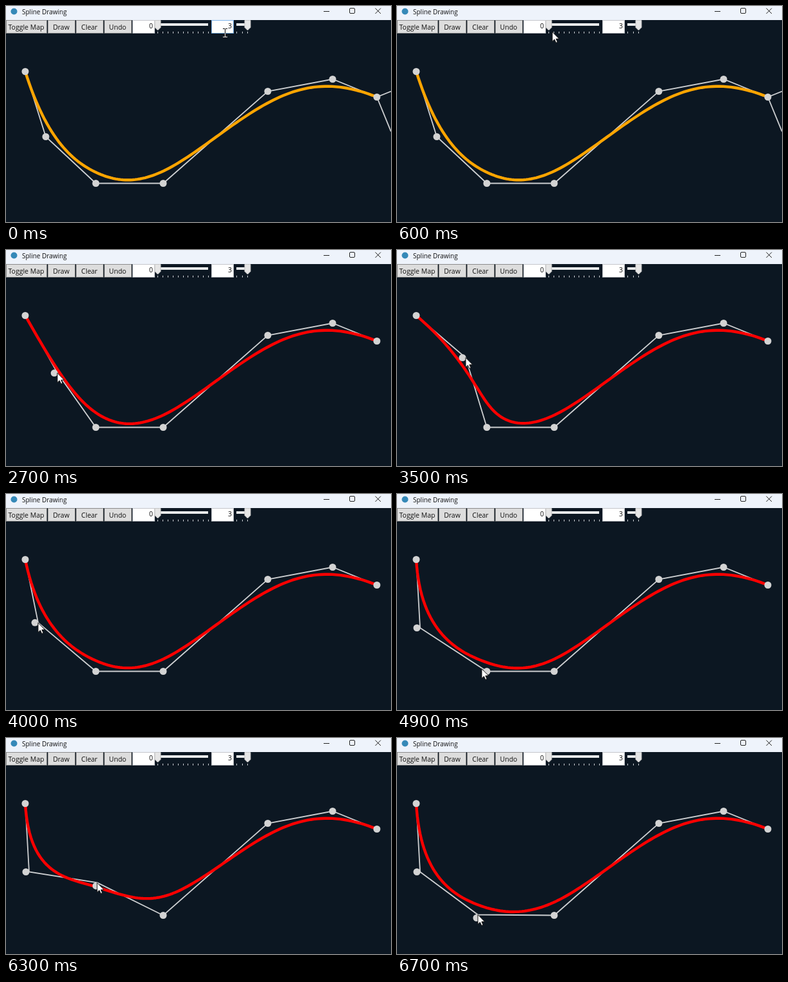
An HTML page with a canvas for the animation above (6.8 s loop, 600 by 338 pixels).

```html
<!DOCTYPE html>
<html lang="en">
<head>
<meta charset="utf-8">
<title>Spline Drawing</title>
<style>
html, body { margin: 0; width: 100%; height: 100%; overflow: hidden; background: #0c1722; }
canvas { display: block; }
</style>
</head>
<body>
<canvas id="stage" width="600" height="338"></canvas>
<script>
const ctx = document.getElementById('stage').getContext('2d');
const LOOP = 6800, STEP = 100, CLEARED = 1200, GRABBED = 2200;
const FONT = '"Open Sans", "Noto Sans", sans-serif';
const points = [[30, 102], [62, 204], [140, 277], [245, 277], [408, 133], [509, 114], [578, 142]];
const buttons = [['Toggle Map', 0, 64], ['Draw', 65, 43], ['Clear', 109, 43], ['Undo', 153, 43]];
const boxes = [['0', 197, 34], ['3', 320, 34]];

// Pointer stops: time, x, y
const stops = [
  [300, 341, 42], [1000, 90, 38], [1500, 90, 38], [GRABBED, 67, 204], [3500, 107, 168],
  [4200, 36, 209], [4900, 132, 273], [5100, 142, 272], [5800, 165, 156], [6700, 126, 276]
];
const drags = [
  { index: 1, from: GRABBED, to: 4200 },
  { index: 2, from: 5100, to: LOOP }
];

const clamp = (v, low, high) => Math.min(Math.max(v, low), high);
const knot = i => clamp(i - 3, 0, 4);

function pointer(t) {
  t = clamp(t, stops[0][0], stops[stops.length - 1][0]);
  const i = Math.max(1, stops.findIndex(stop => stop[0] >= t));
  const [t0, x0, y0] = stops[i - 1], [t1, x1, y1] = stops[i];
  const f = (t - t0) / (t1 - t0), e = f * f * (3 - 2 * f);
  return [x0 + (x1 - x0) * e, y0 + (y1 - y0) * e];
}

function basis(i, k, u) {
  if (!k) return knot(i) <= u && u < knot(i + 1) ? 1 : 0;
  const left = knot(i + k) - knot(i), right = knot(i + k + 1) - knot(i + 1);
  return (left ? (u - knot(i)) / left * basis(i, k - 1, u) : 0) +
    (right ? (knot(i + k + 1) - u) / right * basis(i + 1, k - 1, u) : 0);
}

function spline(vertices) {
  return Array.from({ length: 121 }, (_, n) => {
    const u = Math.min(n / 30, 4 - 1e-9);
    return vertices.reduce(([x, y], p, i) => {
      const w = basis(i, 3, u);
      return [x + w * p[0], y + w * p[1]];
    }, [0, 0]);
  });
}

function rect(x, y, w, h, fill, stroke) {
  ctx.fillStyle = fill;
  ctx.fillRect(x, y, w, h);
  if (stroke) {
    ctx.lineWidth = 1;
    ctx.strokeStyle = stroke;
    ctx.strokeRect(x + .5, y + .5, w - 1, h - 1);
  }
}

function path(list, width, stroke, fill) {
  ctx.beginPath();
  list.forEach(p => ctx.lineTo(...p));
  if (fill) {
    ctx.closePath();
    ctx.fillStyle = fill;
    ctx.fill();
  }
  ctx.lineWidth = width;
  ctx.strokeStyle = stroke;
  ctx.stroke();
}

function dot(x, y, r, fill) {
  ctx.beginPath();
  ctx.arc(x, y, r, 0, 7);
  ctx.fillStyle = fill;
  ctx.fill();
}

function text(s, x, y, align, size) {
  ctx.font = `${size}px ${FONT}`;
  ctx.textAlign = align;
  ctx.fillStyle = '#111';
  ctx.fillText(s, x, y);
}

function slider(start, end, thumb, count, gap) {
  rect(start, 27, end - start, 4, '#e9ecec');
  for (let i = 0; i < count; i++) rect(Math.round(start + i * gap), 40, 1, 3, '#c8ccd0');
  path([[thumb - 4.5, 22.5], [thumb + 4.5, 22.5], [thumb + 4.5, 33.5], [thumb, 38], [thumb - 4.5, 33.5]],
    1, '#c4c4c4', '#e6e6e6');
}

function titleBar() {
  rect(0, 0, 600, 22, '#eef3fb');
  dot(12.5, 8.5, 5, '#3589b8');
  text('Spline Drawing', 25, 12.5, 'left', 10);
  path([[495, 8.5], [504, 8.5]], 1, '#222');
  ctx.beginPath();
  ctx.roundRect(535.5, 3.5, 8, 8, 1.5);
  ctx.stroke();
  path([[575.5, 3.5], [584, 12]], 1, '#222');
  path([[584, 3.5], [575.5, 12]], 1, '#222');
}

function toolbar(over) {
  for (const [label, left, w] of buttons) {
    const hot = over(left, w);
    rect(left, 22, w, 21, hot ? '#bee6fd' : '#dddddd', hot ? '#3c7fb1' : '#8a8a8a');
    text(label, left + w / 2 - .5, 37, 'center', 10.5);
  }
  for (const [label, left, w] of boxes) {
    rect(left, 22, w + 1, 21, '#fff', over(left, w) ? '#7eb4ea' : '#c4c6ca');
    text(label, left + w - 2, 34.5, 'right', 10.5);
  }
  slider(236, 315, 236.5, 11, 7.9);
  slider(359, 377, 376.5, 3, 8.5);
}

function textCursor(x, y) {
  ctx.globalCompositeOperation = 'difference';
  rect(x, y - 6, 1, 13, '#fff');
  for (const dy of [-7, 6]) {
    rect(x - 3, y + dy, 3, 1, '#fff');
    rect(x + 1, y + dy, 3, 1, '#fff');
  }
  ctx.globalCompositeOperation = 'source-over';
}

function arrow(x, y) {
  const shape = [[0, 0], [0, 15], [3.4, 11.8], [5.8, 17], [8.2, 16], [5.9, 11], [10.6, 10.7]];
  path(shape.map(p => [x + p[0], y + p[1] + .5]), 1, '#111', '#fff');
}

function scene(t) {
  const handles = [...points], vertices = [...points];
  for (const { index, from, to } of drags) {
    if (t <= from) continue;
    const grab = pointer(from), now = pointer(Math.min(t, to));
    vertices[index] = now;
    handles[index] = points[index].map((v, axis) => v + now[axis] - grab[axis]);
  }
  ctx.save();
  ctx.translate(0, .5);
  ctx.lineJoin = 'miter';
  path(vertices, 1.8, '#cdcfd1');
  if (t < CLEARED) path([[600, 133], points[6], [600, 196]], 1.8, '#cdcfd1');
  ctx.lineJoin = 'round';
  path(spline(vertices), 4.4, t < GRABBED ? '#ffa500' : '#ff0000');
  for (const p of handles) dot(...p, 5.5, '#d3d3d3');
  ctx.restore();
}

function draw(t) {
  const [x, y] = pointer(t).map(Math.round);
  const over = (left, w) => y >= 22 && y <= 43 && x >= left && x < left + w;
  rect(0, 0, 600, 338, '#0c1722');
  scene(t);
  titleBar();
  toolbar(over);
  const cursor = boxes.some(([, left, w]) => over(left, w)) ? textCursor : arrow;
  cursor(x, y);
}

const start = performance.now();
function tick() {
  const t = (performance.now() - start) % LOOP;
  draw(Math.floor(t / STEP) * STEP);
  requestAnimationFrame(tick);
}
tick();
</script>
</body>
</html>
```
